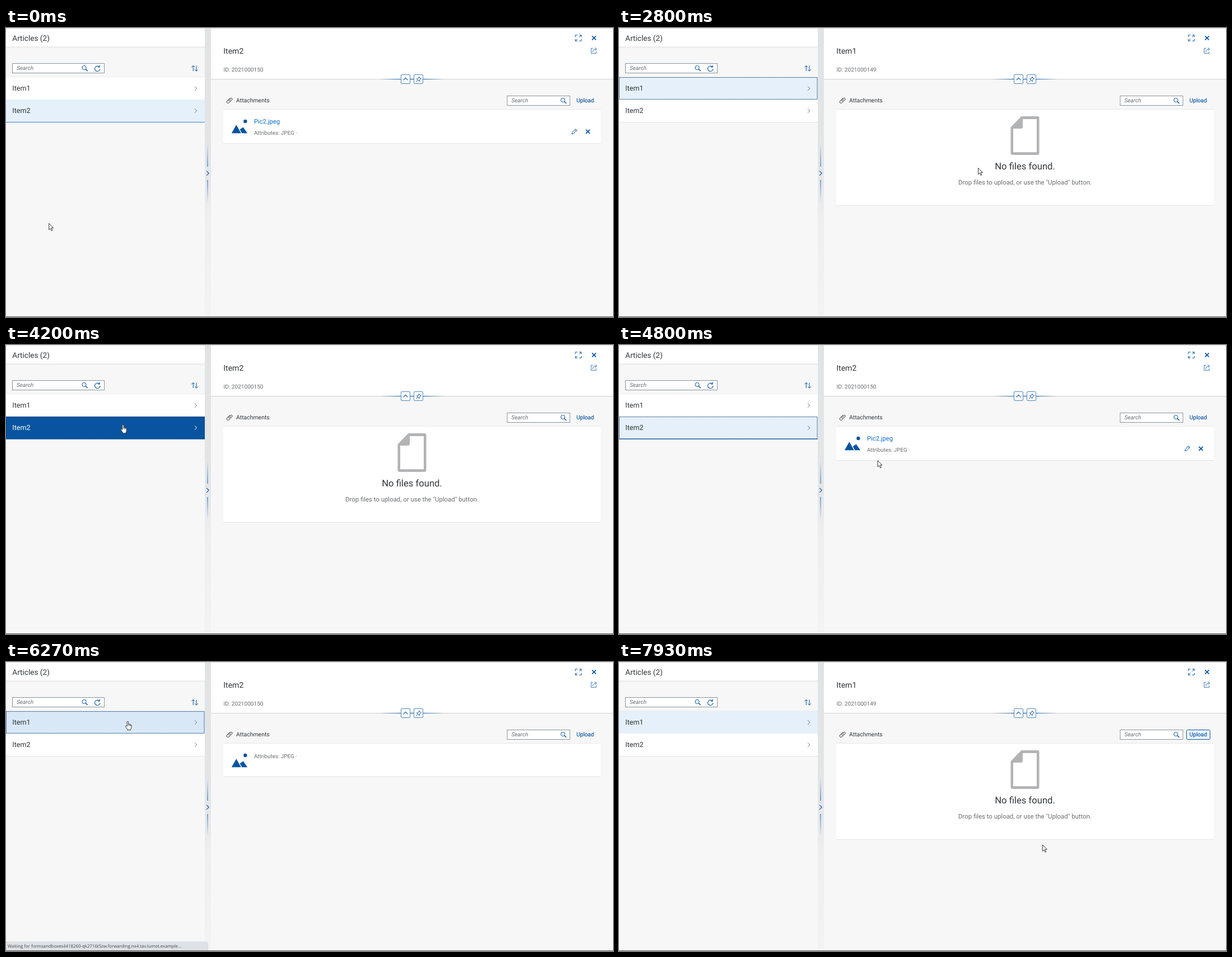
An HTML page that plays this animation: 1084x517 px, repeating every 8 s.

```html
<!DOCTYPE html>
<html lang="en">
<head>
<meta charset="utf-8">
<title>Articles</title>
<style>
  html, body { margin: 0; width: 100%; height: 100%; overflow: hidden; background: #f7f7f7; }
  svg { display: block; width: 100%; height: 100%; }
  text { font-family: Roboto, Arial, sans-serif; fill: #32363a; text-rendering: geometricPrecision; white-space: pre; }
  .grey { fill: #6a6d70; }
  .link { fill: #0a6ed1; }
  .hint { fill: #6a6d70; font-style: italic; }
  .icon { fill: none; stroke: #0854a0; }
  .box { fill: #fff; stroke: #89919a; }
  .solid { fill: #0854a0; }
</style>
</head>
<body>
<svg id="stage" viewBox="0 0 1084 517" preserveAspectRatio="none"></svg>
<script>
const LOOP = 8000, STEP = 200 / 3;

// Markup helpers
const rect = (x, y, w, h, fill, extra = '') =>
  `<rect x="${x}" y="${y}" width="${w}" height="${h}" fill="${fill}" ${extra}/>`;
const text = (x, y, size, value, extra = '') =>
  `<text x="${x}" y="${y}" font-size="${size}" ${extra}>${value}</text>`;
const icon = (d, width = 1, extra = '') =>
  `<path class="icon" d="${d}" stroke-width="${width}" ${extra}/>`;
const group = (id, body) => `<g id="${id}">${body}</g>`;
const fade = (id, dir, stops) =>
  `<linearGradient id="${id}" ${dir}>${stops.map(([at, color, alpha = 1]) =>
    `<stop offset="${at}" stop-color="${color}" stop-opacity="${alpha}"/>`).join('')}</linearGradient>`;
const searchField = (x, y, w, lens) =>
  `<rect class="box" x="${x + .5}" y="${y + .5}" width="${w}" height="17"/>` +
  text(x + 8, y + 12, 10.1, 'Search', 'class="hint"') +
  `<circle class="icon" cx="${lens}" cy="${y + 8}" r="3.6"/>` +
  icon(`M${lens + 2.6} ${y + 10.6}l3.6 3.4`, 1.4);

const DOWN = 'x1="0" y1="0" x2="0" y2="1"';
const BLUE = '#0854a0';

const row = (n, y) => group('row' + n,
  rect(0, y, 355, 40, '#fff', `id="bg${n}"`) +
  rect(0, y + 40, 355, 1, '#e5e5e5', `id="rule${n}"`) +
  rect(.5, y + .5, 353.5, 39, 'none', `id="focus${n}" stroke="#0b3c70" stroke-dasharray="1 .6"`) +
  text(11.3, y + 24, 12.6, 'Item' + n, `id="label${n}"`) +
  `<path id="arrow${n}" d="M337.2 ${y + 16.5}l3.4 3.6-3.4 3.6" fill="none" stroke="#6a6d70"/>`);

const leftPane =
  rect(0, 0, 355, 34, '#fff') +
  rect(0, 33.5, 355, 1, '#dcdcdc') + rect(0, 34.5, 355, 1, '#eeeeee') +
  text(11.3, 23, 13.6, 'Articles (2)') +
  searchField(11, 63, 164, 139.6) +
  icon('M166.3 69.2A4.7 4.7 0 1 0 168 73M167.3 66.5V70H163.8', 1.1) +
  icon('M334.3 77V67.3M331.3 70.3l3-3 3 3M340 67.5V77.2M337 74.2l3 3 3-3') +
  rect(0, 87.5, 355, 1, '#e5e5e5') +
  row(1, 88) + row(2, 128);

const splitter =
  rect(355, 0, 11, 517, 'url(#bar)') +
  rect(359.5, 208, 1, 40, 'url(#gripTop)') +
  rect(359.5, 272, 1, 40, 'url(#gripEnd)') +
  icon('M358.2 255.8l4 4-4 4', 1.1);

const header =
  rect(366, 0, 718, 91, '#fff') +
  rect(366, 91, 718, 1, '#d9d9d9') + rect(366, 92, 718, 1, '#efefef') +
  text(388.3, 45.5, 14, 'Item2', 'id="title"') +
  text(388.5, 78, 10.1, 'ID: 2021000150', 'id="code" class="grey"') +
  icon('M1016.8 16.3V12.7H1020.5M1023.7 12.7H1027.3V16.3M1027.3 19.6V23.2H1023.7M1020.5 23.2H1016.8V19.6M1023.6 16.6l3.4-3.6M1020.4 19.4l-3.3 3.5') +
  icon('M1046.6 14.3l7 7M1053.6 14.3l-7 7', 1.7) +
  icon('M1048 36.3H1045V45.3H1054V42M1047.8 43q.4-5 5.6-5.2M1051.4 35.2l3.6 2.6-3.6 2.8', 1, 'opacity=".8"') +
  rect(666, 91, 118, 1, 'url(#sweep)') +
  [705.5, 728.5].map(x => rect(x, 83.5, 16, 16, '#fff', `rx="1.5" stroke="#4d86bd"`)).join('') +
  icon('M709.5 93.4l4-4 4 4', 1.1) +
  icon('M737.4 87l4 4-1.3.4-1.7 1.7-.3 2.6-4.7-4.7 2.6-.3 1.7-1.7zM735.6 93.1l-3.3 3.2');

const toolbar =
  icon('M396.2 130.4l4.7-4.5a1.9 1.9 0 0 1 2.7 2.7l-5.4 5.2a2.4 2.4 0 0 1-3.4-3.4l5.2-5M398 131.5l4-3.9', 1, 'style="stroke:#32363a"') +
  text(411, 133.3, 10.45, 'Attachments') +
  searchField(894.5, 121, 112, 994.5) +
  rect(1013.5, 121.5, 42, 17, '#ebf5fe', `id="button" rx="2" stroke="${BLUE}"`) +
  text(1018.8, 133.3, 10, 'Upload', `style="fill:${BLUE}" stroke="${BLUE}" stroke-width=".15"`) +
  rect(388, 145, 674, 1, '#e8e8e8');

const fileItem = group('file',
  rect(388, 146, 674, 60, '#fff', 'id="sheet"') +
  rect(388, 206, 674, 1, '#e5e5e5', 'id="edge"') +
  '<path class="solid" d="M402.8 188.3L411.3 173.2 419.8 188.3ZM417.6 181.6L423.6 177.4 431.2 188.3H421.3Z"/>' +
  '<circle class="solid" cx="427.3" cy="167" r="3.2"/>' +
  text(443, 190.5, 9.85, 'Attributes: JPEG ·', 'id="attrs" class="grey"') +
  group('named',
    text(443, 171.3, 11.2, 'Pic2.jpeg', 'class="link"') +
    icon('M1010.6 189.6l.8-3.2 5.8-5.8 2.4 2.4-5.8 5.8zM1015.8 182l2.4 2.4') +
    icon('M1035.6 181.9l7 7M1042.6 181.9l-7 7', 1.8)));

const noFiles = group('empty',
  rect(388, 146, 674, 171, '#fff') + rect(388, 317, 674, 1, '#e5e5e5') +
  `<path fill="#b2b3b5" fill-rule="evenodd" d="M718.5 158H747.5a3 3 0 0 1 3 3V224a3 3 0 0 1-3 3H702.5a3 3 0 0 1-3-3V177.5Z
    M721 163V177a3 3 0 0 1-3 3H704V222.3H746V163Z"/>` +
  text(725, 253.3, 16.65, 'No files found.', 'text-anchor="middle"') +
  text(725, 280, 11.4, 'Drop files to upload, or use the "Upload" button.', 'text-anchor="middle" class="grey"'));

const statusBar = group('status',
  '<path d="M0 500.5H357.5a3 3 0 0 1 3 3V516H0Z" fill="#dee1e6" stroke="#cfd2d6" stroke-width=".6"/>' +
  text(3, 511.4, 7.85, 'Waiting for formsandboxes4418260-qk2716t5zw.forwarding.nx4.tav.lumot.example...',
    'style="font-family:\'Open Sans\',sans-serif;fill:#45484c"'));

const pointer = group('cursor',
  '<path id="tip" d="M0 0V11.3L2.6 8.9 4.5 13.2 6.3 12.4 4.5 8.2H8Z" fill="#fff" stroke="#222" stroke-width=".9"/>' +
  `<path id="hand" d="M-1.2 1.2A1.2 1.2 0 0 1 1.2 1.2V5Q2.4 4.2 3.2 5.4 4.5 4.9 5 6 6.4 5.8 6.4 7.4V10.6Q6.4 12.2 5.2 13.4V15.4H-.6V14L-3.8 9.6Q-4.6 8 -3.2 7.6-2.2 7.5-1.2 9Z
    M1.2 5V7.6M3.2 5.6V7.8M5 6.2V8" fill="#fff" stroke="#222" stroke-width=".9" stroke-linejoin="round"/>`);

document.getElementById('stage').innerHTML = '<defs>' +
  fade('bar', DOWN, [[0, '#dfe3e6'], [.5, '#e3e6e9'], [.65, '#eceef0'], [1, '#f2f3f4']]) +
  fade('gripTop', DOWN, [[0, BLUE, 0], [1, BLUE]]) +
  fade('gripEnd', DOWN, [[0, BLUE], [1, BLUE, 0]]) +
  fade('sweep', '', [[0, BLUE, 0], [.35, BLUE], [.65, BLUE], [1, BLUE, 0]]) +
  '</defs>' + rect(0, 0, 1084, 517, '#f7f7f7') +
  leftPane + header + splitter + toolbar + fileItem + noFiles + statusBar +
  rect(0, 0, 1084, 1, '#dddddd') + rect(0, 516, 1084, 1, '#5c5c5c') + pointer;

const el = id => document.getElementById(id);
const set = (id, attrs) => { for (const k in attrs) el(id).setAttribute(k, attrs[k]); };
const show = (id, on) => { el(id).style.display = on ? '' : 'none'; };

// Pointer path: time, x, y
const PATH = [
  [0, 76.7, 349.6], [70, 76.7, 349.6], [670, 138, 111], [1530, 138, 111],
  [2330, 160, 121], [2800, 641.5, 250.5], [3200, 640, 236], [3530, 250, 112],
  [3670, 250, 112], [3930, 209, 142.5], [4400, 209, 142.5], [4930, 507, 218],
  [5300, 430, 190], [5670, 203.3, 120], [5800, 199.5, 111.5], [5930, 196.5, 103.5],
  [6200, 196.5, 103.5], [6800, 968.5, 182.8], [7200, 1035, 128], [7400, 1035, 128],
  [7800, 771, 329], [7930, 756.3, 327], [8000, 756.3, 327]
];

const slope = (i, c) => {
  const a = PATH[i - 1], b = PATH[i], d = PATH[i + 1];
  if (!a || !d || (b[c] - a[c]) * (d[c] - b[c]) <= 0) return 0;
  return (d[c] - a[c]) / (d[0] - a[0]);
};

function place(t) {
  let i = 0;
  while (i < PATH.length - 2 && t >= PATH[i + 1][0]) i++;
  const a = PATH[i], b = PATH[i + 1], span = b[0] - a[0];
  const u = Math.min(1, Math.max(0, (t - a[0]) / span)), v = 1 - u;
  return [1, 2].map(c =>
    a[c] * v * v * (1 + 2 * u) + b[c] * u * u * (3 - 2 * u) +
    span * u * v * (slope(i, c) * v - slope(i + 1, c) * u));
}

const rowAt = ([x, y]) => x < 355 && y >= 88 && y < 168 ? (y < 128 ? 1 : 2) : 0;
const between = (t, a, b) => t >= a && t < b;
// Value of the last [time, value] pair that has begun
const pick = (t, list) => list.reduce((v, [at, next]) => t >= at ? next : v, null);

function paintRow(n, selected, hover, pressed, focus) {
  set('bg' + n, { fill: pressed ? BLUE : selected ? (hover ? '#d8e8f7' : '#e5f0fa') : hover ? '#f5f5f5' : '#fff' });
  set('rule' + n, { fill: selected ? '#3f86c6' : '#e5e5e5' });
  show('focus' + n, focus);
  el('label' + n).style.fill = pressed ? '#fff' : '';
  set('arrow' + n, { stroke: pressed ? '#fff' : '#6a6d70' });
}

function draw(time) {
  const t = Math.floor((time % LOOP + 4) / STEP) * STEP + 4;
  const [x, y] = place(t - 4);
  const hover = rowAt(place(Math.max(0, t - 4 - STEP)));
  const overButton = x > 1013 && x < 1056 && y > 121 && y < 139;
  const selected = pick(t, [[0, 2], [1330, 1], [4130, 2], [6130, 1]]);
  const pressed = between(t, 4130, 4330) ? 2 : between(t, 6130, 6200) ? 1 : 0;
  const item = pick(t, [[0, 2], [1730, 1], [4130, 2], [6330, 1]]);
  const view = pick(t, [[0, 'full'], [1330, 'bare'], [2330, 'empty'], [4400, 'bare'],
    [4600, 'full'], [6130, 'bare'], [6530, 'empty']]);

  for (const n of [1, 2])
    paintRow(n, n === selected, n === hover, n === pressed, n === selected && between(t, 1330, 7330));

  el('title').textContent = 'Item' + item;
  el('code').textContent = 'ID: 2021000' + (148 + item);
  show('file', view !== 'empty');
  show('empty', view === 'empty');
  show('named', view === 'full');
  const bare = view === 'bare';
  set('attrs', { y: bare ? 171.8 : 190.5 });
  set('sheet', { height: bare ? 58.5 : 60 });
  set('edge', { y: bare ? 204.5 : 206 });

  show('status', between(t, 1330, 2130) || between(t, 6130, 6600));
  show('button', t >= 7330 || overButton);
  const hand = rowAt([x, y]) > 0 || overButton;
  show('hand', hand);
  show('tip', !hand);
  set('cursor', { transform: `translate(${x.toFixed(1)} ${y.toFixed(1)})` });
}

const start = performance.now();
function tick() {
  draw(performance.now() - start);
  requestAnimationFrame(tick);
}
tick();
</script>
</body>
</html>
```
